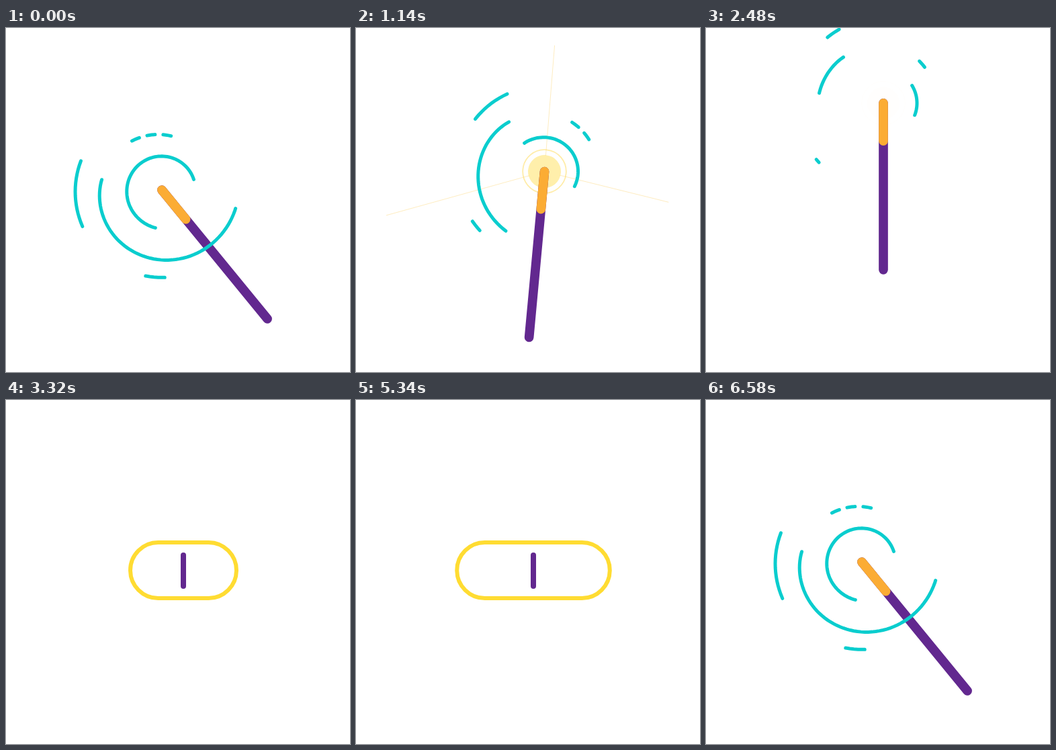
An HTML page for the animation above (6.7 s loop, 512 by 512 pixels).

```html
<!DOCTYPE html>
<html lang="en">
<head>
<meta charset="utf-8">
<title>Wand and search bar</title>
<style>
  html, body { margin: 0; width: 100%; height: 100%; overflow: hidden; background: #fff; }
  svg { display: block; width: 100%; height: 100%; }
</style>
</head>
<body>
<svg id="stage" viewBox="0 0 512 512" fill="none" stroke-linecap="round">
  <rect id="bar" stroke="#ffdc32" stroke-width="6"/>
  <g id="wand">
    <g class="tip">
      <g id="rays" stroke="#fbc540" stroke-width="1"></g>
      <g id="glow">
        <circle r="24.5" fill="#ffdc46"/>
        <circle r="32.3" stroke="#ffd640" stroke-width="1.8"/>
      </g>
    </g>
    <line id="stick" stroke="#62288f"/>
    <line id="spark" stroke="#fbac34"/>
    <g class="tip" id="arcs" stroke="#0acdce" stroke-width="5"></g>
  </g>
</svg>
<script>
const LOOP = 6700, STEP = 20;
const LONG = 248, SHORT = 46;
const BAR_HEIGHT = 83, BAR_EXTRA = 289;
const SWING = 56.9, REST_TILT = -39.3, REST_SWEEP = .573;

const $ = id => document.getElementById(id);
const set = (el, attrs) => { for (const k in attrs) el.setAttribute(k, attrs[k]); };
const add = (parent, tag, attrs = {}) => {
  const el = document.createElementNS('http://www.w3.org/2000/svg', tag);
  set(el, attrs);
  return parent.appendChild(el);
};
const polar = (deg, r) => {
  const a = deg * Math.PI / 180;
  return [r * Math.cos(a), -r * Math.sin(a)];
};

const ease = (t, from, to) => {
  const u = Math.min(1, Math.max(0, (t - from) / (to - from)));
  return u * u * (3 - 2 * u);
};
// A value that begins at base and is changed by eased moves [from, to, amount].
const moves = (base, ...list) => t =>
  list.reduce((sum, [from, to, by]) => sum + by * ease(t, from, to), base);

const tilt = moves(REST_TILT, [555, 1391, SWING],
  [1900, 2300, -SWING - REST_TILT], [5900, 6580, REST_TILT]);
const midX = moves(310.5, [500, 1890, -94], [1900, 2300, 47.5],
  [3320, 3600, -142], [5000, 5320, 142], [5760, 6580, 46.5]);
const midY = moves(337, [1900, 2240, 55], [2240, 2640, -241], [2640, 3020, 103],
  [5400, 5760, -121], [5760, 6160, 204]);
const wandLength = moves(LONG, [2600, 3040, SHORT - LONG], [5360, 5660, LONG - SHORT]);

const sweep = moves(REST_SWEEP, [240, 960, .28 - REST_SWEEP], [960, 1900, .72],
  [1900, 2640, -1], [5760, 6580, REST_SWEEP]);
const glow = moves(0, [600, 1400, .6], [2100, 2500, -.6], [5700, 5950, .6], [6200, 6560, -.6]);
const rayAlpha = moves(0, [600, 900, .6], [900, 1400, -.6], [5700, 5900, .6], [5950, 6560, -.6]);
const rayReach = moves(.2, [600, 950, .8], [5000, 5100, -.8], [5700, 6000, .8]);

const barHeight = moves(0, [2980, 3200, BAR_HEIGHT], [5520, 5640, -BAR_HEIGHT]);
const barExtra = moves(0, [3200, 3560, BAR_EXTRA], [5160, 5520, -BAR_EXTRA]);

function blink(t) {
  if (t < 3620 || t > 4980) return 1;
  const u = (t - 3620) % 680;
  return 1 - ease(u, 0, 270) + ease(u, 410, 680);
}

// Spiral pieces around the tip; angles run counter-clockwise, bend shapes the widening.
const arcs = [
  { from: -21, to: 361, inner: 50, outer: 78.4, bend: 3 },
  { from: 401, to: 474, inner: 81.5, outer: 88.5, bend: 1, dash: 12 },
  { from: 491, to: 779, inner: 90.7, outer: 125.7, bend: .9 },
  { from: 841, to: 918, inner: 128, outer: 131.5, bend: 1 },
  { from: 940, to: 962, inner: 130.3, outer: 130.3, bend: 1 }
].map(arc => {
  const { from, to, inner, outer, bend } = arc;
  const n = Math.ceil((to - from) / 3);
  const points = Array.from({ length: n + 1 }, (_, i) =>
    polar(from + (to - from) * i / n, inner + (outer - inner) * (i / n) ** bend));
  const el = add($('arcs'), 'path', { d: 'M' + points.join('L') });
  return { ...arc, el, total: el.getTotalLength() };
});

const rays = [[90.7, 188], [-8.6, 190], [200.8, 244]].map(([deg, reach]) =>
  ({ el: add($('rays'), 'line'), deg, reach }));

function drawArc({ el, dash, total }, part) {
  const pattern = [];
  let left = part * total;
  const piece = dash || left;
  for (; left > 1; left -= 2 * piece) pattern.push(Math.min(piece, left), piece);
  pattern[pattern.length - 1] = 9999;
  set(el, { 'stroke-dasharray': pattern.join(' ') });
}

function drawBar(t) {
  const h = barHeight(t), w = h + barExtra(t);
  set($('bar'), {
    x: 264 - w / 2, y: 253.5 - h / 2, width: w, height: h, rx: h / 2,
    visibility: h > 1 ? 'visible' : 'hidden'
  });
}

function drawWand(t) {
  const len = wandLength(t), top = -len / 2;
  const grown = (len - SHORT) / (LONG - SHORT), width = 8 + 5.7 * grown;
  set($('wand'), { transform: `translate(${midX(t)} ${midY(t)}) rotate(${tilt(t)})` });
  set($('stick'), { y1: top, y2: -top, 'stroke-width': width, opacity: blink(t) });
  set($('spark'), {
    y1: top, y2: top + 56.3 * grown, 'stroke-width': width, opacity: Math.min(1, grown * 3)
  });
  for (const el of document.querySelectorAll('.tip')) set(el, { transform: `translate(0 ${top})` });
}

function drawMagic(t) {
  const part = sweep(t), shown = part > .05;
  set($('arcs'), { visibility: shown ? 'visible' : 'hidden' });
  if (shown) arcs.forEach(arc => drawArc(arc, part));
  set($('glow'), { opacity: glow(t) });
  set($('rays'), { opacity: rayAlpha(t) });
  for (const { el, deg, reach } of rays) {
    const [x1, y1] = polar(deg, 24), [x2, y2] = polar(deg, reach * rayReach(t));
    set(el, { x1, y1, x2, y2 });
  }
}

const start = performance.now();
function frame() {
  const elapsed = (performance.now() - start) % LOOP;
  const t = Math.floor(elapsed / STEP) * STEP;
  drawBar(t);
  drawWand(t);
  drawMagic(t);
  requestAnimationFrame(frame);
}
frame();
</script>
</body>
</html>
```
